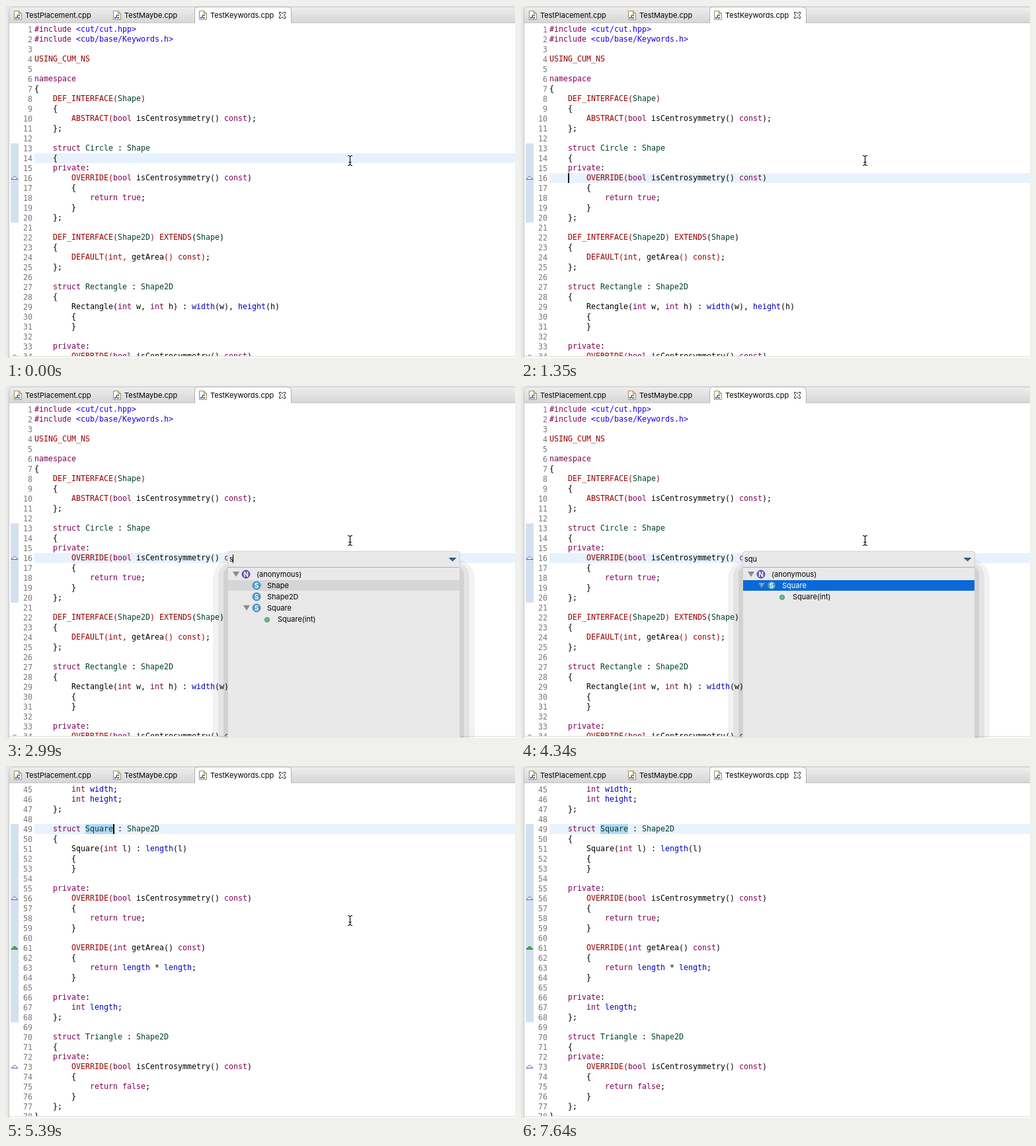
An HTML page with a canvas that plays this animation: 770 px wide and 533 px high, repeating every 7.74 s.

```html
<!DOCTYPE html>
<html lang="en">
<head>
<meta charset="utf-8">
<title>Quick outline</title>
<style>
html, body { margin: 0; width: 100%; height: 100%; overflow: hidden; background: #fff; }
canvas { display: block; }
</style>
</head>
<body>
<canvas id="stage" width="770" height="533"></canvas>
<script>
const W = 770, H = 533, LOOP = 7740;
const ctx = document.getElementById('stage').getContext('2d');
const MONO = '11.63px "DejaVu Sans Mono", monospace';
const UI = '11px Inter, sans-serif';
const LINE = 15, COL = 7, LEFT = 43, TOP = 28, BOTTOM = 530;

const pageA = `#include <cut/cut.hpp>
#include <cub/base/Keywords.h>

USING_CUM_NS

namespace
{
    DEF_INTERFACE(Shape)
    {
        ABSTRACT(bool isCentrosymmetry() const);
    };

    struct Circle : Shape
    {
    private:
        OVERRIDE(bool isCentrosymmetry() const)
        {
            return true;
        }
    };

    DEF_INTERFACE(Shape2D) EXTENDS(Shape)
    {
        DEFAULT(int, getArea() const);
    };

    struct Rectangle : Shape2D
    {
        Rectangle(int w, int h) : width(w), height(h)
        {
        }

    private:
        OVERRIDE(bool isCentrosymmetry() const)`.split('\n');

const pageB = `        int width;
        int height;
    };

    struct Square : Shape2D
    {
        Square(int l) : length(l)
        {
        }

    private:
        OVERRIDE(bool isCentrosymmetry() const)
        {
            return true;
        }

        OVERRIDE(int getArea() const)
        {
            return length * length;
        }

    private:
        int length;
    };

    struct Triangle : Shape2D
    {
    private:
        OVERRIDE(bool isCentrosymmetry() const)
        {
            return false;
        }
    };
}`.split('\n');

const syntax = [
  ['#980000', /DEFAULT\(int,|(?<=getArea)\(\) const\)(?=;)|(?<=FACE\(\w+)\)|EXTENDS|[A-Z][A-Z_]{3,}\(?/],
  ['#1a00e0', /<[^>]+>/],
  ['#7f0055', /#include|\b(?:namespace|struct|private|bool|int|const|return|true|false)\b/],
  ['#004028', /\b(?:Shape2D|Shape|Circle|Rectangle|Square|Triangle)\b(?!\()/],
  ['#0000c0', /\b(?:width|height|length)\b/],
  ['#000', /\w+|[^\w\s]/]
];
const lexer = new RegExp(syntax.map(([, re]) => `(${re.source})`).join('|'), 'g');

// depth, icon, label, type
const outline = [
  [0, 'inc', 'cut/cut.hpp'], [0, 'inc', 'cub/base/Keywords.h'], [0, 'using', 'cum'],
  [0, 'N', '(anonymous)'],
  [1, 'S', 'Shape'], [2, 'pubC', 'isCentrosymmetry()', 'bool'],
  [1, 'S', 'Circle'], [2, 'privC', 'isCentrosymmetry()', 'bool'],
  [1, 'S', 'Shape2D'], [2, 'pubC', 'getArea()', 'int'],
  [1, 'S', 'Rectangle'], [2, 'pub', 'Rectangle(int, int)'],
  [2, 'privC', 'isCentrosymmetry()', 'bool'], [2, 'privC', 'getArea()', 'int'],
  [2, 'field', 'width', 'int'], [2, 'field', 'height', 'int'],
  [1, 'S', 'Square'], [2, 'pub', 'Square(int)']
];

function filterRows(query) {
  const hit = r => r[2].toLowerCase().startsWith(query);
  return outline.filter((row, i) => {
    if (hit(row)) return true;
    for (let k = i + 1; k < outline.length && outline[k][0] > row[0]; k++)
      if (hit(outline[k])) return true;
    return false;
  });
}

const within = (t, ...spans) => spans.some(([a, b]) => t >= a && t < b);

function rect(x, y, w, h, color) {
  ctx.fillStyle = color;
  ctx.fillRect(x, y, w, h);
}

function round(x, y, w, h, r, fill, stroke) {
  ctx.beginPath();
  ctx.roundRect(x, y, w, h, r);
  if (fill) { ctx.fillStyle = fill; ctx.fill(); }
  if (stroke) { ctx.strokeStyle = stroke; ctx.lineWidth = 1; ctx.stroke(); }
}

function poly(points, fill, stroke) {
  ctx.beginPath();
  for (let i = 0; i < points.length; i += 2) ctx.lineTo(points[i], points[i + 1]);
  ctx.closePath();
  if (fill) { ctx.fillStyle = fill; ctx.fill(); }
  if (stroke) { ctx.strokeStyle = stroke; ctx.lineWidth = 1; ctx.stroke(); }
}

function text(s, x, y, color, font = UI, align = 'left') {
  ctx.font = font;
  ctx.textAlign = align;
  ctx.fillStyle = color;
  ctx.fillText(s, x, y);
}

function clipped(x, y, w, h, draw) {
  ctx.save();
  ctx.beginPath();
  ctx.rect(x, y, w, h);
  ctx.clip();
  draw();
  ctx.restore();
}

function fileIcon(x) {
  poly([x + .5, 7.5, x + 7.5, 7.5, x + 11.5, 11.5, x + 11.5, 20.5, x + .5, 20.5], '#fbfaf1', '#a58c56');
  poly([x + 7.5, 7.5, x + 11.5, 11.5, x + 7.5, 11.5], '#e3d4a4', '#a58c56');
  rect(x + 2, 17, 2, 2, '#23527e');
  text('c', x + 4, 19, '#23527e', 'bold 10px Inter, sans-serif');
}

function activeTab() {
  ctx.beginPath();
  ctx.moveTo(285.5, 26);
  ctx.lineTo(285.5, 6);
  ctx.quadraticCurveTo(285.5, 1.5, 291, 1.5);
  ctx.lineTo(425, 1.5);
  ctx.quadraticCurveTo(431.5, 1.5, 431.5, 7);
  ctx.lineTo(431.5, 26);
  ctx.fillStyle = '#fff';
  ctx.fill();
  ctx.strokeStyle = '#b0b0b0';
  ctx.lineWidth = 1;
  ctx.stroke();
  fileIcon(292);
  text('TestKeywords.cpp', 309, 18, '#000');
  poly([413.5, 9.5, 416, 9.5, 418, 11.5, 420, 9.5, 422.5, 9.5, 422.5, 11.5, 420.5, 14, 422.5, 16.5,
    422.5, 18.5, 420, 18.5, 418, 16.5, 416, 18.5, 413.5, 18.5, 413.5, 16.5, 415.5, 14, 413.5, 11.5], '#fff', '#1c1c1c');
}

function frameBox() {
  rect(0, 0, W, H, '#fff');
  rect(0, 0, W, 26, '#e7e7e7');
  const g = ctx.createLinearGradient(0, 1, 0, 26);
  g.addColorStop(0, '#eeeeee');
  g.addColorStop(1, '#d6d6d6');
  round(4.5, 1.5, 780, 30, [6, 0, 0, 0], g, '#cacaca');
  rect(5, 26, W, H, '#fff');
  rect(5, 25, W, 1, '#c6c6c6');
  rect(0, 2, 4, H, '#e7e7e7');
  rect(4, 8, 1, H, '#c2c2c2');
  fileIcon(12);
  text('TestPlacement.cpp', 29, 18, '#000');
  fileIcon(162);
  text('TestMaybe.cpp', 179, 18, '#000');
  activeTab();
  rect(5, BOTTOM, W, 1, '#dedede');
}

const lineY = (n, first) => TOP + (n - first) * LINE;

function highlight(n, first) {
  rect(LEFT, lineY(n, first), W, LINE, '#e8f2fe');
}

function drawCode(lines) {
  lines.forEach((line, i) => {
    for (const m of line.matchAll(lexer)) {
      const kind = m.slice(1).findIndex(Boolean);
      text(m[0], LEFT + m.index * COL, TOP + i * LINE + 11, syntax[kind][0], MONO);
    }
  });
}

function drawNumbers(first) {
  for (let i = 0; i < 34; i++) {
    const s = String(first + i);
    text(s, 40 - s.length * COL, TOP + i * LINE + 12, '#787878', MONO);
  }
}

function marker(n, first, full) {
  const y = lineY(n, first);
  poly([8, y + 9.5, 12.5, y + 5, 13.5, y + 5, 18, y + 9.5], full ? '#43b649' : '#fff', full ? '#16793a' : '#6152b8');
}

const hatch = (() => {
  const c = document.createElement('canvas');
  c.width = c.height = 2;
  const p = c.getContext('2d');
  p.fillStyle = '#e4eefa';
  p.fillRect(0, 0, 2, 2);
  p.fillStyle = '#c2d2e4';
  p.fillRect(0, 0, 1, 1);
  p.fillRect(1, 1, 1, 1);
  return ctx.createPattern(c, 'repeat');
})();

function markersA() {
  marker(16, 1);
  marker(34, 1);
}

function markersB() {
  marker(56, 45);
  marker(61, 45, true);
  marker(73, 45);
}

function caret(x, y, w = 2, h = LINE) {
  rect(x, y, w, h, '#000');
}

function pageOne(t) {
  frameBox();
  const current = t < 150 ? 14 : t < 300 ? 15 : 16;
  clipped(0, 26, W, BOTTOM - 26, () => {
    rect(7, lineY(13, 1), 12, 8 * LINE, hatch);
    highlight(current, 1);
    drawNumbers(1);
    drawCode(pageA);
    markersA();
  });
  if (within(t, [300, 750], [1350, 1640])) caret(71, lineY(16, 1));
}

function pageTwo(t) {
  frameBox();
  clipped(0, 26, W, BOTTOM - 26, () => {
    rect(7, lineY(49, 45), 12, 20 * LINE, hatch);
    highlight(49, 45);
    rect(120, lineY(49, 45), 42, LINE, '#b0d7fc');
    drawNumbers(45);
    drawCode(pageB);
    markersB();
  });
  if (within(t, [5390, 5840], [6420, 7020], [7470, 7640])) caret(162, lineY(49, 45));
}

// Half-repainted editor between the two scroll positions
function pageTorn(t) {
  pageOne(t);
  rect(0, 0, 274, H, '#e6e6e6');
  rect(274, 0, 11, 26, '#e6e6e6');
  rect(7, TOP, 34, BOTTOM - TOP, '#fff');
  clipped(0, 26, 41, BOTTOM - 26, () => {
    drawNumbers(45);
    markersB();
  });
}

function disc(x, y, letter, edge, fill, ink) {
  round(x - 6, y - 6, 12, 12, 6, fill, edge);
  text(letter, x, y + 3.5, ink, 'bold 10px Inter, sans-serif', 'center');
}

function icon(kind, x, y) {
  if (kind === 'N') disc(x, y, 'N', '#54459b', '#6b5bb0', '#fff');
  else if (kind === 'S') disc(x, y, 'S', '#3d83b4', '#4f9bc9', '#fff');
  else if (kind === 'inc') {
    rect(x - 6, y - 5, 5, 6, '#2b72ad');
    rect(x, y - 5, 6, 10, '#1f5f9c');
    rect(x - 4, y + 2, 8, 3, '#1f5f9c');
  } else if (kind === 'using') {
    rect(x - 5, y - 5, 7, 3, '#d94a62');
    rect(x - 5, y - 1, 11, 3, '#5b62b4');
    rect(x - 5, y + 3, 11, 3, '#d94a62');
  } else if (kind === 'field') round(x - 1.5, y - 1.5, 4, 4, 0, '#fff', '#d64848');
  else {
    if (kind.startsWith('pub')) round(x - 3.5, y - 2.5, 7, 7, 3.5, '#6cbd8c', '#2f8a57');
    else {
      round(x - 3.5, y - 2.5, 6, 6, 0, '#ee8590', '#c9303f');
      rect(x - 2, y, 4, 1, '#c9303f');
    }
    if (kind.endsWith('C')) text('C', x + 7.5, y - 1, '#2d6f9c', 'bold 8px Inter, sans-serif');
  }
}

function drawRow(row, i, selected, next, wide, focus) {
  const [depth, kind, label, type] = row;
  const y = 285 + i * 17, x = 363 + depth * 16;
  if (selected) rect(336, y - 8, wide ? 350 : 335, 16, focus ? '#0a68d8' : '#d6d6d6');
  if (next && next[0] > depth)
    poly([x - 20, y - 4, x - 10, y - 4, x - 15, y + 4], focus && selected ? '#7f9cb8' : '#8a8a8a');
  icon(kind, x, y);
  text(label, x + 16, y + 4, focus && selected ? '#fff' : '#000');
  if (type) {
    const w = ctx.measureText(label).width;
    text(' : ' + type, x + 16 + w, y + 4, '#957d47');
  }
}

function popup(t) {
  round(313, 262, 396, 320, 30, 'rgba(0,0,0,.05)');
  round(321, 267, 380, 320, 22, 'rgba(0,0,0,.06)');
  round(329, 272, 364, 320, 14, 'rgba(0,0,0,.08)');
  round(335, 250, 352, 300, 4, '#d2d2d2');
  round(336, 251, 350, 300, 3, '#e9e9e9');
  rect(336, 274, 350, 1, '#b0b0b0');
  poly([670.5, 260.5, 680.5, 260.5, 675.5, 265], '#2d6a9e', '#1d4d7c');

  const query = t < 2990 ? '' : t < 3440 ? 's' : t < 3590 ? 'sq' : 'squ';
  text(query, 338, 266, '#000');
  if (within(t, [1640, 2240], [2690, 4040]))
    caret(query ? 336 + query.length * 7 : 338, 255, 1, 13);

  const rows = filterRows(query).slice(0, 15);
  const chosen = query ? 1 : 6;
  rows.forEach((row, i) => drawRow(row, i, i === chosen, rows[i + 1], !!query, t >= 4340));
  if (!query) {
    rect(671, 275, 15, H, '#f0f0f0');
    round(675, 280, 8, 131, 4, '#c1c1c1');
  }
}

function beam(x, y) {
  const stroke = (color, width) => {
    ctx.strokeStyle = color;
    ctx.lineWidth = width;
    ctx.beginPath();
    for (const s of [-1, 1]) {
      ctx.moveTo(x + s * 3.5, y + .5);
      ctx.quadraticCurveTo(x, y + .5, x, y + 3);
      ctx.moveTo(x + s * 3.5, y + 15.5);
      ctx.quadraticCurveTo(x, y + 15.5, x, y + 13);
    }
    ctx.moveTo(x, y + 2);
    ctx.lineTo(x, y + 14);
    ctx.moveTo(x - 2, y + 10.5);
    ctx.lineTo(x + 2, y + 10.5);
    ctx.stroke();
  };
  stroke('rgba(255,255,255,.8)', 2.4);
  stroke('#000', 1.1);
}

function pointer(t) {
  if (t < 6130) beam(520.5, 226);
  else if (t < 6270) beam(523.5, 227);
  else if (t < 6420) beam(638.5, 341);
}

function render(t) {
  if (t < 5240) pageOne(t);
  else if (t < 5390) pageTorn(t);
  else pageTwo(t);
  if (within(t, [1640, 5240])) popup(t);
  pointer(t);
}

const start = performance.now();
function tick() {
  render((performance.now() - start) % LOOP);
  requestAnimationFrame(tick);
}
tick();
</script>
</body>
</html>
```
